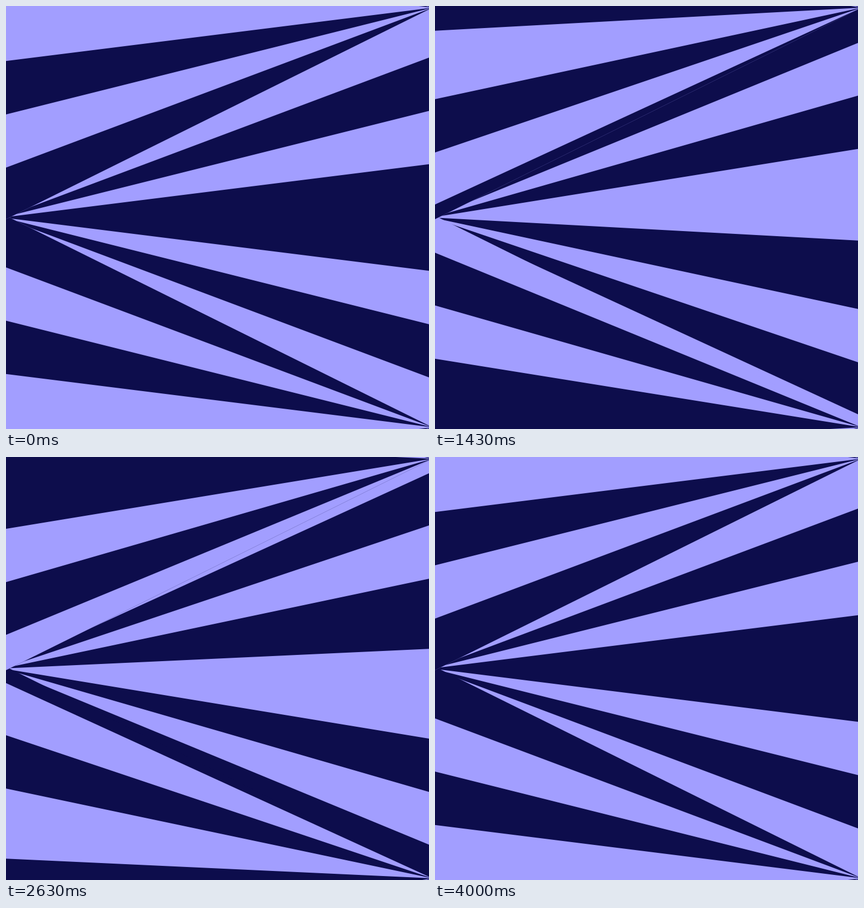
An HTML page with a canvas for the animation above (4.03 s loop, 748 by 748 pixels).

```html
<!DOCTYPE html>
<html lang="en">
<head>
<meta charset="utf-8">
<title>Sliding fans</title>
<style>
  html, body { margin: 0; width: 100%; height: 100%; overflow: hidden; background: #0d0d4c; }
  canvas { display: block; width: 100vw; height: 100vh; }
</style>
</head>
<body>
<canvas id="stage" width="748" height="748"></canvas>
<script>
const ctx = document.getElementById('stage').getContext('2d');
const SIZE = 748;
const TIP = 6;            // height of a fan's narrow end
const LOOP = 4030;
const STEP = 2000;        // time for an edge to reach the next stop
const DARK = '#0d0d4c';
const LIGHT = '#a29eff';
const STOPS = [0, 91.2, 185.4, 279.7, 468.3, 562.6, 656.8, SIZE];

// Edge positions along the wide side, from top to bottom.
function edgesAt(progress) {
  const moved = STOPS.slice(0, -1).map((y, i) => y + (STOPS[i + 1] - y) * progress);
  return [0, ...moved, SIZE];
}

// A band between two edges; each edge runs from the wide to the narrow side.
function band(fan, from, to, color) {
  const wide = y => fan.wideTop + y;
  const narrow = y => fan.tipTop + y * TIP / SIZE;
  ctx.fillStyle = color;
  ctx.beginPath();
  ctx.moveTo(fan.wideX, wide(from));
  ctx.lineTo(SIZE - fan.wideX, narrow(from));
  ctx.lineTo(SIZE - fan.wideX, narrow(to));
  ctx.lineTo(fan.wideX, wide(to));
  ctx.fill();
}

function drawFan(fan, edges, parity) {
  const last = edges.length - 1;
  for (let i = 0; i < last; i++) {
    // Reach under the following band so that no seam shows.
    const end = edges[Math.min(i + 2, last)];
    band(fan, edges[i], end, (i + parity + fan.parity) % 2 ? LIGHT : DARK);
  }
}

const half = (SIZE - TIP) / 2;
const fans = [
  { wideX: SIZE, wideTop: 0, tipTop: half, parity: 0 },
  { wideX: 0, wideTop: half, tipTop: SIZE - TIP, parity: 1 },
  { wideX: 0, wideTop: -half, tipTop: 0, parity: 1 }
];

function draw(time) {
  const t = Math.min(time % LOOP, 2 * STEP - 1);
  const edges = edgesAt(t % STEP / STEP);
  const parity = Math.floor(t / STEP);
  fans.forEach(fan => drawFan(fan, edges, parity));
}

const start = performance.now();
function tick() {
  draw(performance.now() - start);
  requestAnimationFrame(tick);
}
tick();
</script>
</body>
</html>
```
